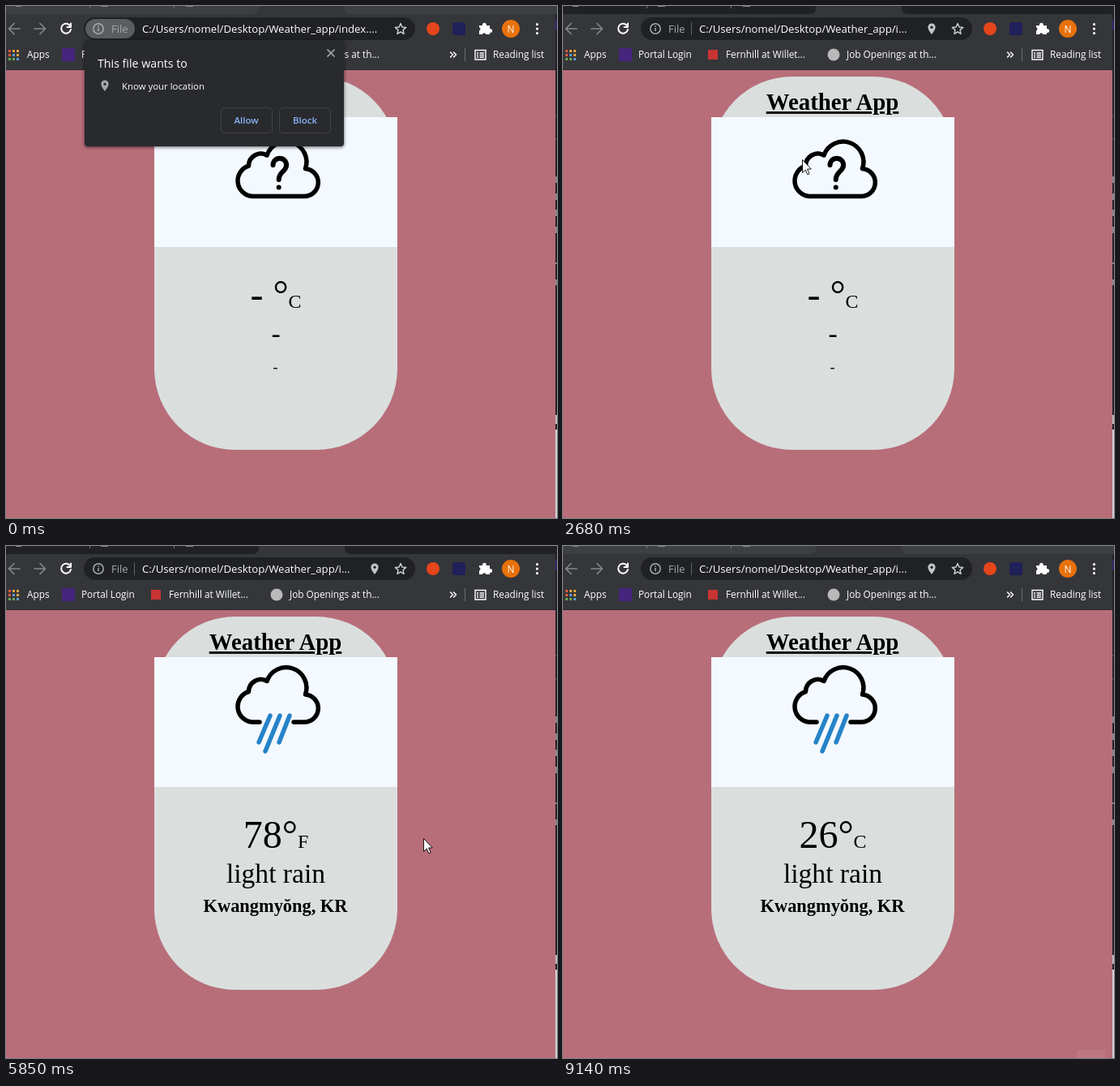
These frames come from a looping animation (680 by 631 pixels, 9200 ms). An HTML page:

```html
<!DOCTYPE html>
<html lang="en">
<head>
<meta charset="utf-8">
<title>Weather App</title>
<style>
html, body { margin: 0; width: 100%; height: 100%; overflow: hidden; background: #b76e79 }
svg { display: block; width: 680px; height: 631px }
.ui { font: 11.8px "Open Sans", "Noto Sans", sans-serif; fill: #fff }
.card { font-family: "Liberation Serif", "Times New Roman", serif; text-anchor: middle }
.line { fill: none; stroke-linecap: round; stroke-linejoin: round }
#popup { filter: drop-shadow(0 1px 2px #0009) }
.button { fill: #292a2d; stroke: #3f4247 }
.action { font-size: 11.5px; fill: #8ab4f8; font-weight: 600; text-anchor: middle }
</style>
</head>
<body>
<svg viewBox="0 0 680 631">
  <defs>
    <path id="marker" d="M0-6.5a4.6 4.6 0 0 0-4.6 4.6C-4.6 1.8 0 7 0 7S4.6 1.8 4.6-1.9A4.6 4.6 0 0 0 0-6.5Zm0 3a1.7 1.7 0 0 1 0 3.4a1.7 1.7 0 0 1 0-3.4Z" fill-rule="evenodd"/>
  </defs>

  <!-- page -->
  <rect width="680" height="631" fill="#b76e79"/>
  <rect x="183" y="87" width="300" height="460" rx="100" fill="#dadfde"/>
  <rect x="183" y="137" width="300" height="160" fill="#f4f9ff"/>
  <g class="line" stroke="#000" stroke-width="5.5">
    <path id="cloud"/>
    <path id="question" d="M329.5 196a8.3 8.3 0 0 1 16.6 0c0 8-9.4 8-9.4 18M336.7 223.5v.1" stroke-width="6"/>
    <path id="drops" d="M326 209l-14 33M338 209l-18 44M350 209l-13 33" stroke="#2583c8"/>
  </g>
  <g class="card">
    <text x="332.5" y="128" font-size="28.8" font-weight="bold" text-decoration="underline">Weather App</text>
    <text x="333" y="372" font-size="48"><tspan id="degrees"></tspan><tspan id="unit" font-size="24"></tspan></text>
    <text id="sky" x="333" y="415" font-size="33.6"></text>
    <text id="place" x="332.5" y="451"></text>
  </g>
  <rect id="corner" x="634" y="621" width="35" height="10" fill="#bd7780"/>

  <!-- window behind -->
  <rect x="678" y="79" width="2" height="443" fill="#232328"/>
  <path d="M678 135h2M678 164h2" stroke="#555"/>
  <path d="M679 210v8M679 231v8M679 251v8M679 272v8M678 317h2M679 337v7" stroke="#aaa" stroke-width="1.5"/>
  <path d="M679 504v11" stroke="#bbb" stroke-width="2"/>
  <rect x="678" y="522" width="2" height="109" fill="#d0d1d4"/>

  <!-- browser -->
  <g class="ui">
    <rect id="strip" width="680" height="10"/>
    <path d="M304 10q8 0 8-8V0H418V2q0 8 8 8Z" fill="#35363a"/>
    <path d="M103.5 0v3M207.5 0v3" stroke="#73767b"/>
    <path d="M12 .5h7M117 .5h9M222 .5h9" stroke="#85878b"/>
    <rect y="10" width="680" height="69" fill="#35363a"/>
    <path d="M0 78.5H680" stroke="#28292c"/>
    <path d="M679 10V79" stroke="#202124" stroke-width="2"/>
    <path d="M679 17v13" stroke="#34256b" stroke-width="2"/>

    <g class="line" stroke="#85878b" stroke-width="1.7">
      <path d="M17 28H4M10 21.5L3.5 28l6.5 6.5M35 28H48M42 21.5L48.5 28l-6.5 6.5"/>
      <path d="M79.5 25A6 6 0 1 0 80 29M80 21.5V26H75.5" stroke="#fff" stroke-width="2"/>
    </g>
    <rect x="96" y="14" width="409" height="28" rx="14" fill="#202124"/>
    <rect id="chip" x="98" y="16" width="61" height="24" rx="12" fill="#5b5d61"/>
    <path id="divider" d="M158.5 20V36" stroke="#5f6368"/>
    <g stroke="#a5aab0" fill="none" stroke-width="1.5">
      <circle cx="114" cy="28" r="6.2"/>
      <path d="M114 27v4M114 24.3v1.5"/>
    </g>
    <text x="130" y="33" font-size="13" fill="#a5aab0">File</text>
    <text id="address" x="168" y="33" font-size="13.2"></text>
    <use id="pin" href="#marker" x="455" y="28" fill="#c3c6ca"/>
    <path class="line" d="M487 21.5l1.9 4.5 4.8.4-3.7 3.2 1.1 4.7-4.1-2.5-4.1 2.5 1.1-4.7-3.7-3.2 4.8-.4Z" stroke="#d0d2d5" stroke-width="1.4"/>
    <circle cx="527" cy="28" r="8" fill="#e5461b"/>
    <rect x="551" y="20" width="16" height="16" rx="3" fill="#20205a"/>
    <path d="M584 24h4a2.5 2.5 0 1 1 4.8 0H597v4a2.5 2.5 0 1 1 0 4.8V35h-4.5a2.4 2.4 0 0 0-4.6 0H584v-4.5a2.3 2.3 0 0 0 0-4.3Z"/>
    <circle cx="623" cy="28" r="11" fill="#e8710a"/>
    <text x="623" y="32.5" font-size="12" text-anchor="middle">N</text>
    <path d="M655.5 22.5v.1M655.5 28v.1M655.5 33.5v.1" class="line" stroke="#fff" stroke-width="3.2"/>

    <g id="grid"></g>
    <text x="26" y="64">Apps</text>
    <rect x="69" y="52" width="16" height="16" fill="#45257d"/>
    <text x="93" y="64">Portal Login</text>
    <rect x="179" y="54" width="12" height="12" fill="#c93434"/>
    <text x="201" y="64">Fernhill at Willet...</text>
    <circle cx="334" cy="60" r="7.5" fill="#b9b9b9"/>
    <text x="350" y="64">Job Openings at th...</text>
    <path class="line" d="M548.5 57l3 3-3 3M552.5 57l3 3-3 3" stroke="#fff" stroke-width="1.5"/>
    <path d="M566.5 52V68" stroke="#6b6d70"/>
    <path d="M579 54.5h13v11.5h-13ZM581 58h2M584.5 58h5.5M581 60.5h2M584.5 60.5h5.5M581 63h2M584.5 63h5.5" fill="none" stroke="#fff" stroke-width="1.4"/>
    <text x="601" y="64">Reading list</text>
  </g>

  <!-- permission prompt -->
  <g id="popup" class="ui">
    <rect x="97" y="42" width="320" height="131" rx="4" fill="#292a2d"/>
    <text x="113" y="76" font-size="14.2">This file wants to</text>
    <use href="#marker" x="122" y="98" fill="#a5aab0"/>
    <text x="143" y="103" font-size="11.4">Know your location</text>
    <path d="M396.5 53.5l9 9M405.5 53.5l-9 9" stroke="#a5aab0" stroke-width="1.7"/>
    <rect id="allow" class="button" x="265.5" y="125.5" width="63" height="31" rx="4"/>
    <rect class="button" x="337.5" y="125.5" width="63" height="31" rx="4"/>
    <text class="action" x="296.5" y="145">Allow</text>
    <text class="action" x="369" y="145">Block</text>
  </g>

  <g id="pointer">
    <circle id="press" r="12" fill="#b4b414" opacity=".82"/>
    <path id="arrow" d="M.5.5V16.5L4.2 13l2.6 5.8 2.3-1L6.5 12h4.8Z" fill="#fff" stroke="#000" stroke-width=".9"/>
    <path id="hand" d="M-2 2a2 2 0 0 1 4 0V8c1-1 3-1 3.3.5 1-1 2.7-.5 2.8 1 1.3-.8 2.6 0 2.6 1.3V17l-2 6.3H-1.5L-5.3 15c-1.5-3 1-4.3 2.3-2l1 1.5ZM2 8v4M5.3 8.500v4M8.100 9.500v3" fill="#fff" stroke="#000"/>
  </g>
</svg>
<script>
const LOOP = 9200, STEP = 70;
const $ = id => document.getElementById(id);
const show = (id, on) => $(id).style.display = on ? "" : "none";
const put = (id, text) => { if ($(id).textContent !== text) $(id).textContent = text; };
const within = (t, a, b) => t >= a && t < b;

const CLOUD = "M355 234.5H367A17 17 0 0 0 369.5 200.5A25 25 0 0 0 322 184" +
  "A15 15 0 0 0 299.5 197A19.2 19.2 0 0 0 304 234.5H313";

// Pointer stops: time, x, y
const stops = [
  [70, 583, 580], [950, 289, 175], [1010, 289, 173], [1430, 289, 136],
  [1910, 290, 136], [2540, 294, 186], [2680, 295, 189],
  [3110, 295, 189], [3670, 516, 235], [4000, 516, 235], [4560, 388, 382],
  [4700, 376, 368], [4970, 359, 359], [5370, 359, 359], [5910, 538, 360],
  [6170, 538, 360], [6650, 335, 353], [7450, 335, 353], [7800, 580, 538],
  [8000, 580, 538], [8210, 612, 611]
];

function pointerAt(t) {
  const i = stops.findIndex(s => s[0] > t);
  if (i < 0) return stops.at(-1).slice(1);
  if (i === 0) return stops[0].slice(1);
  const [t0, x0, y0] = stops[i - 1], [t1, x1, y1] = stops[i];
  const u = Math.floor((t - t0) / STEP) * STEP / (t1 - t0);
  const k = u * u * (3 - 2 * u);
  return [x0 + (x1 - x0) * k, y0 + (y1 - y0) * k];
}

function drawPointer(t) {
  const [x, y] = pointerAt(t);
  const over = t > 3180 && x > 183 && x < 483 && y > 330 && y < 385;
  $("pointer").setAttribute("transform", `translate(${Math.round(x)} ${Math.round(y)})`);
  show("pointer", within(t, 70, 8210));
  show("arrow", !over);
  show("hand", over);
  show("press", within(t, 1630, 1840) || within(t, 5240, 5440) || within(t, 6930, 7110));
}

function drawBrowser(t) {
  const granted = t >= 1840;
  const fade = Math.max(0, Math.floor((t - 1840) / STEP) * STEP);
  $("strip").setAttribute("fill", within(t, 1630, 9000) ? "#202124" : "#3c4043");
  show("popup", fade < 150);
  $("popup").setAttribute("opacity", 1 - fade / 150);
  $("popup").setAttribute("transform", `translate(${fade / 20} ${fade / 45})`);
  $("allow").style.fill = within(t, 1220, 1840) ? "#2e353e" : "";
  show("chip", t < 2050);
  show("divider", t >= 2050);
  show("pin", granted);
  put("address", "C:/Users/nomel/Desktop/Weather_app/i" + (granted ? "..." : "ndex...."));
  show("corner", t >= 9000);
}

function drawWeather(t) {
  const known = t >= 3180, fahrenheit = within(t, 5440, 7110);
  $("cloud").setAttribute("d", known ? CLOUD : CLOUD + "Z");
  $("cloud").setAttribute("transform", `translate(0 ${known ? -17.5 : 0})`);
  show("question", !known);
  show("drops", known);
  put("degrees", !known ? "- °" : fahrenheit ? "78°" : "26°");
  put("unit", fahrenheit ? "F" : "C");
  put("sky", known ? "light rain" : "-");
  put("place", known ? "Kwangmyŏng, KR" : "-");
  $("place").style.font = known ? "bold 22.4px 'Liberation Serif', serif" : "18px 'Liberation Serif', serif";
}

const tints = ["#e0563f", "#e8a33d", "#e8a33d", "#e0563f", "#5b9bd5", "#e8a33d", "#6aa84f", "#6aa84f", "#5b9bd5"];
$("grid").innerHTML = tints.map((c, i) =>
  `<rect x="${3 + i % 3 * 5}" y="${54 + Math.floor(i / 3) * 5}" width="3" height="3" fill="${c}"/>`).join("");

const start = performance.now();
function frame() {
  const t = (performance.now() - start) % LOOP;
  drawBrowser(t);
  drawWeather(t);
  drawPointer(t);
  requestAnimationFrame(frame);
}
frame();
</script>
</body>
</html>
```
